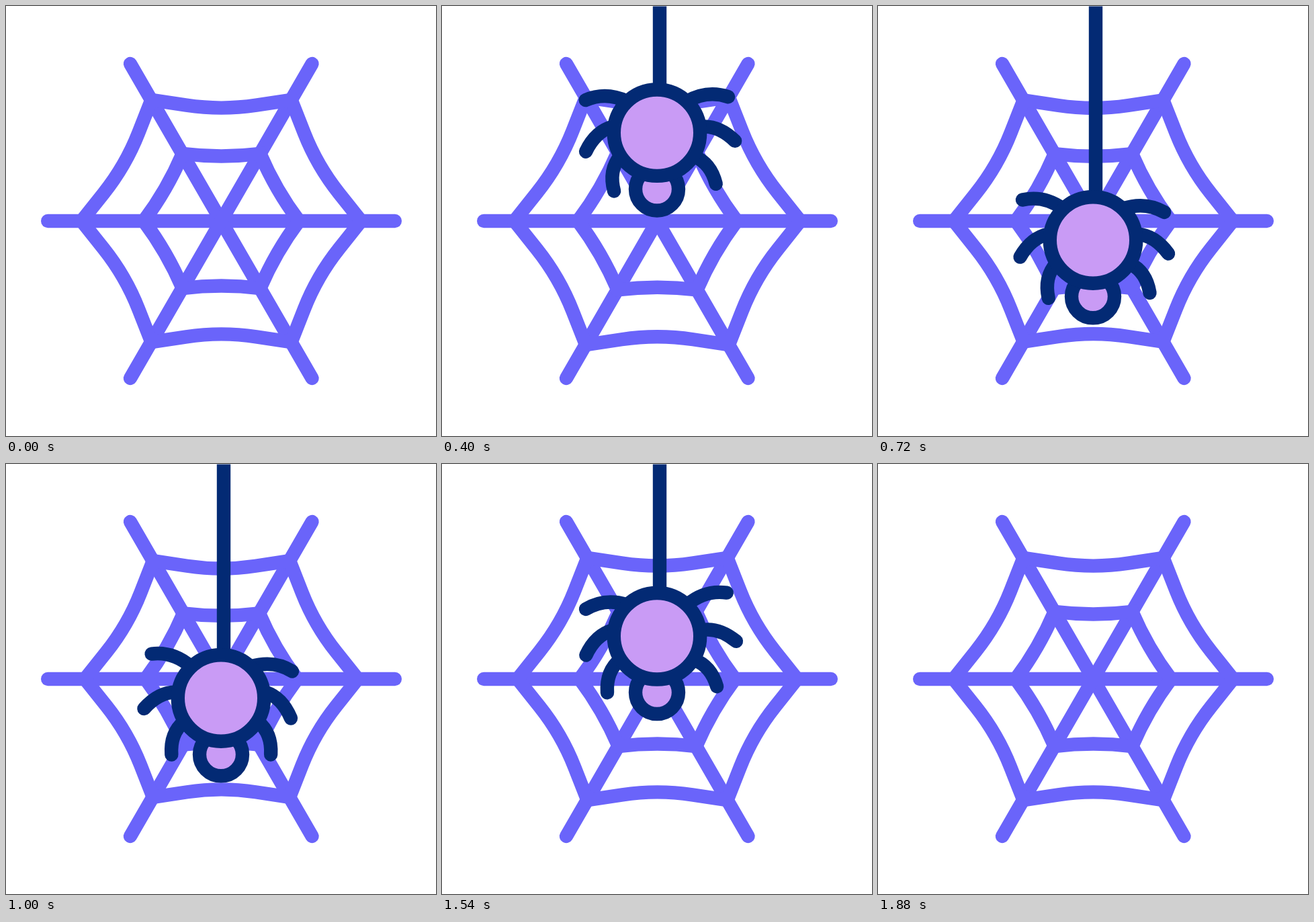
Recreate the animation shown at these times as an HTML page with a canvas. Size 640 by 640 pixels, loop 2400 ms.

```html
<!DOCTYPE html>
<html lang="en">
<head>
<meta charset="utf-8">
<title>Spider on a web</title>
<style>
html, body { margin: 0; width: 100%; height: 100%; overflow: hidden; background: #fff; }
canvas { display: block; width: 640px; height: 640px; }
</style>
</head>
<body>
<canvas id="stage" width="640" height="640"></canvas>
<script>
const ctx = document.getElementById('stage').getContext('2d');
const LOOP = 2400, ARRIVE = 635, LEAVE = 1380, CLIMB = 600;
const WEB = '#6a64fa', NAVY = '#032a74', LILAC = '#c99bf5';
const CX = 320.5, CY = 320, LINE = 20.4;
const REST_Y = 348.5, TRAVEL = 520, THREAD_TOP = 0.6;

// Root, bend and tip of a leg on the right side of the body.
const UPPER = [45, -47, 78, -57, 106, -40];
const MIDDLE = [66, -9, 91, -1, 104, 30];
const LOWER = [55, 35, 76, 52, 74, 84];

// Each leg leaves its rest angle by lift degrees on the way in (over span ms) and by out on the way up.
const LEGS = [
  { shape: UPPER, side: 1, rest: 0, lift: -24, span: 240, out: -24 },
  { shape: MIDDLE, side: 1, rest: 0, lift: -29, span: 390, out: -29 },
  { shape: LOWER, side: 1, rest: 0, lift: -20, span: 510, out: -20 },
  { shape: UPPER, side: -1, rest: -24.5, lift: 25, span: 295, out: 25 },
  { shape: MIDDLE, side: -1, rest: -19, lift: 18.5, span: 510, out: 17 },
  { shape: LOWER, side: -1, rest: 0, lift: 13, span: 540, out: 0 }
];

function ease(u) {
  u = Math.min(1, Math.max(0, u));
  return u * u * (3 - 2 * u);
}

// Rises from 0 to 1 at the peak and falls back, taking span ms each way.
const bump = (t, peak, span) => ease(1 - Math.abs(t - peak) / span);

const spiderY = t => REST_Y - TRAVEL * (1 - ease(t / ARRIVE) + ease((t - LEAVE) / CLIMB));
const stretch = t => 1 + 0.045 * bump(t, 555, 310) - 0.04 * bump(t, 865, 310);
const legAngle = (leg, t) =>
  leg.rest + leg.lift * bump(t, 517, leg.span) + leg.out * bump(t, LEAVE + 180, 180);

function polar(r, turn) {
  const a = turn * Math.PI / 3;
  return [CX + r * Math.cos(a), CY + r * Math.sin(a)];
}

const mix = (a, b, k) => a.map((v, i) => v + (b[i] - v) * k);

function line(x1, y1, x2, y2) {
  ctx.beginPath();
  ctx.moveTo(x1, y1);
  ctx.lineTo(x2, y2);
  ctx.stroke();
}

// Six sagging sides; the first and last part of each, given by straight, is not curved.
function ring(corner, bend, straight) {
  ctx.beginPath();
  for (let i = 0; i < 6; i++) {
    const a = polar(corner, i), b = polar(corner, i + 1), mid = polar(bend, i + 0.5);
    ctx.lineTo(...a);
    ctx.lineTo(...mix(a, mid, straight));
    ctx.quadraticCurveTo(...mid, ...mix(b, mid, straight));
  }
  ctx.closePath();
  ctx.stroke();
}

function disc(y, r) {
  ctx.beginPath();
  ctx.arc(0, y, r, 0, Math.PI * 2);
  ctx.fill();
  ctx.stroke();
}

function drawWeb(t) {
  const k = stretch(t);
  ctx.strokeStyle = WEB;
  ctx.lineCap = 'round';
  ctx.lineJoin = 'miter';
  line(62.2, CY, 578.8, CY);
  line(185, 86, 455.5, 554);
  line(455.5, 86, 185, 554);
  ring(208 * k, 164.5 * k, 0.5);
  ring(115.5 * k, 93 * k, 0);
}

function drawLeg(leg, t) {
  const [x, y, bx, by, tx, ty] = leg.shape;
  ctx.save();
  ctx.scale(leg.side, 1);
  ctx.translate(x, y);
  ctx.rotate(legAngle(leg, t) * Math.PI / 180);
  ctx.beginPath();
  ctx.moveTo(0, 0);
  ctx.quadraticCurveTo(bx - x, by - y, tx - x, ty - y);
  ctx.stroke();
  ctx.restore();
}

function drawSpider(t) {
  const y = spiderY(t);
  ctx.strokeStyle = NAVY;
  ctx.fillStyle = LILAC;
  ctx.lineCap = 'butt';
  line(324, THREAD_TOP, 324, Math.max(THREAD_TOP, y - 60));
  ctx.lineCap = 'round';
  ctx.save();
  ctx.translate(320, y);
  for (const leg of LEGS) drawLeg(leg, t);
  disc(83.8, 32);
  disc(0, 64.2);
  ctx.restore();
}

function draw(t) {
  ctx.fillStyle = '#fff';
  ctx.fillRect(0, 0, 640, 640);
  ctx.lineWidth = LINE;
  drawWeb(t);
  drawSpider(t);
}

const start = performance.now();
function frame(now) {
  draw(Math.max(0, now - start) % LOOP);
  requestAnimationFrame(frame);
}
draw(0);
requestAnimationFrame(frame);
</script>
</body>
</html>
```
